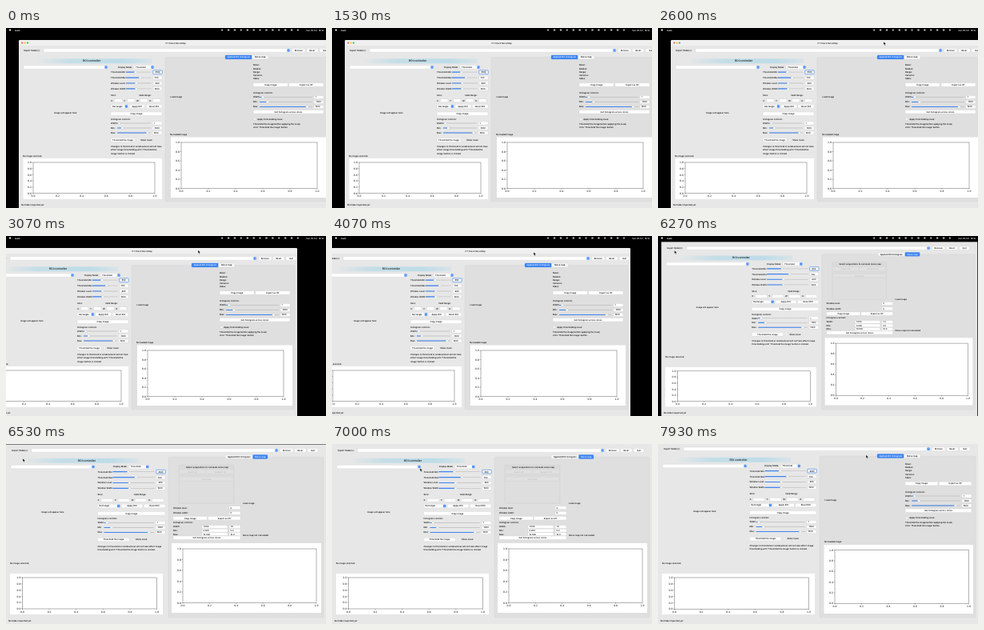
An HTML page that plays this animation: 400 by 225 pixels, repeating every 8000 ms.

```html
<!DOCTYPE html>
<html lang="en">
<head>
<meta charset="utf-8">
<title>Histogram tool</title>
<style>
html, body { margin: 0; width: 100%; height: 100%; overflow: hidden; background: #000; }
svg { display: block; width: 400px; height: 225px; fill: #050505; font: 500 2.65px Inter, "Open Sans", sans-serif; }
text { text-rendering: geometricPrecision; white-space: pre; }
.tick { font: 3.1px "DejaVu Sans", sans-serif; }
</style>
</head>
<body>
<svg id="stage" viewBox="0 0 400 225"></svg>
<script>
const NS = 'http://www.w3.org/2000/svg';
const LOOP = 8000;
const BLUE = '#3d84f2', BG = '#e7e7e7', PANE = '#dfdfdf';
const stage = document.getElementById('stage');

function el(parent, tag, attrs = {}) {
  const node = document.createElementNS(NS, tag);
  for (const k in attrs) node.setAttribute(k, attrs[k]);
  return parent.appendChild(node);
}
const group = parent => el(parent, 'g');
const box = (g, l, t, r, b, fill, extra) =>
  el(g, 'rect', { x: l, y: t, width: r - l, height: b - t, fill, ...extra });
const dot = (g, cx, cy, r, fill) => el(g, 'circle', { cx, cy, r, fill });
function label(g, x, y, str, extra) {
  el(g, 'text', { x, y: y + 0.95, ...extra }).textContent = str;
}
const centred = (g, x, y, str, extra) => label(g, x, y, str, { 'text-anchor': 'middle', ...extra });

function button(g, l, r, y, str, off) {
  box(g, l, y - 2.2, r, y + 2.2, off ? '#e1e1e1' : '#fff', { rx: 1, stroke: off ? '#d6d6d6' : '#c9c9c9', 'stroke-width': 0.3 });
  centred(g, (l + r) / 2, y, str, off && { fill: '#bdbdbd' });
}
function field(g, l, r, y, str = '') {
  box(g, l, y - 2, r, y + 2, '#fff', { stroke: '#c4c4c4', 'stroke-width': 0.3 });
  label(g, l + 1.5, y, str);
}
function combo(g, l, r, y, str = '') {
  box(g, l, y - 2.2, r, y + 2.2, '#fff', { rx: 1, stroke: '#c4c4c4', 'stroke-width': 0.3 });
  box(g, r - 3.6, y - 1.8, r - 0.4, y + 1.8, BLUE, { rx: 0.8 });
  el(g, 'path', { d: `M${r - 2.8} ${y - .4}l.8 -.8l.8 .8M${r - 2.8} ${y + .4}l.8 .8l.8 -.8`, stroke: '#fff', 'stroke-width': 0.35, fill: 'none' });
  label(g, l + 2, y, str);
}
function slider(g, l, r, y, v) {
  const k = l + (r - l) * v;
  box(g, l, y - 0.4, r, y + 0.4, '#c6c6c6', { rx: 0.4 });
  box(g, l, y - 0.6, k, y + 0.6, BLUE, { rx: 0.5 });
  el(g, 'circle', { cx: k, cy: y, r: 1.5, fill: '#fff', stroke: '#b5b5b5', 'stroke-width': 0.3 });
}
function check(g, x, y, str) {
  box(g, x - 1.2, y - 1.2, x + 1.2, y + 1.2, '#fff', { rx: 0.5, stroke: '#bbb', 'stroke-width': 0.3 });
  label(g, x + 3.2, y, str);
}
function lines(g, x, y, list, step = 4.2) {
  list.forEach((s, i) => label(g, x, y + i * step, s));
}
function chart(g, [l, t, r, b], [pl, pt, pr, pb]) {
  box(g, pl, pt, pr, pb, '#fff');
  box(g, l, t, r, b, '#fff', { stroke: '#222', 'stroke-width': 0.35 });
  for (let i = 0; i <= 5; i++) {
    const x = l + (r - l) * i / 5, y = b - (b - t) * i / 5, s = (i / 5).toFixed(1);
    el(g, 'path', { d: `M${x} ${b}v1.2M${l} ${y}h-1.2`, stroke: '#222', 'stroke-width': 0.35 });
    el(g, 'text', { class: 'tick', x, y: b + 4.5, 'text-anchor': 'middle' }).textContent = s;
    el(g, 'text', { class: 'tick', x: l - 2, y: y + 1.1, 'text-anchor': 'end' }).textContent = s;
  }
}

function toolbar(g, x, y) {
  label(g, x + 6, y, 'Import folder(s):');
  combo(g, x + 31, x + 339, y);
  button(g, x + 341.5, x + 358, y, 'Remove');
  button(g, x + 359.5, x + 374, y, 'Reset');
  button(g, x + 376, x + 389, y, 'Quit');
}

function histogram(g, l, r, y, vals) {
  label(g, l, y, 'Histogram controls:');
  ['Width:', 'Min:', 'Max:'].forEach((s, i) => {
    const ry = y + 5 + i * 6;
    label(g, l, ry, s);
    slider(g, l + 8, r - 14, ry, [.06, .15, .9][i]);
    field(g, r - 12, r, ry, vals[i]);
  });
}

function leftPane(g, p) {
  const { x, cx, cr, dy } = p, mid = (cx + cr) / 2;
  const Y = y => y + dy;
  box(g, x + 22, Y(38.3), x + 166, Y(44.3), 'url(#band)');
  centred(g, (x + cr) / 2 + 1.5, Y(41.3), 'ROI controller', { style: 'font-size:3.4px' });
  combo(g, x + 6, x + 111, Y(49));
  label(g, mid - 23, Y(49), 'Display Mode:');
  combo(g, mid - 3, mid + 22, Y(49), 'Threshold');
  [['Threshold Min', .37, '-950'], ['Threshold Max', .55, '700'],
   ['Window Level', .4, '-600'], ['Window Width', .4, '1500']].forEach(([s, v, n], i) => {
    const y = Y(55.2 + i * 6.9);
    label(g, cx, y, s + ':');
    slider(g, cx + 19, cr - 13, y, v);
    field(g, cr - 11, cr, y, n);
  });
  box(g, cr - 11.3, Y(52.8), cr + .3, Y(57.6), 'none', { rx: .6, stroke: '#6aa5f5', 'stroke-width': .8 });
  box(g, cr - 3.2, Y(53.8), cr - 2.8, Y(56.7), '#222', { class: 'caret' });
  label(g, cx, Y(84), 'Slice:');
  label(g, mid + 3, Y(84), 'Valid Range:');
  ['X:', 'Y:', 'W:', 'H:'].forEach((s, i) => {
    const w = (cr - cx) / 4, fx = cx + i * w;
    label(g, fx, Y(90.8), s);
    field(g, fx + 4.5, fx + w - 2, Y(90.8));
  });
  const w = (cr - cx) / 3;
  combo(g, cx, cx + w, Y(98), 'Rectangle');
  button(g, cx + w + 1.5, cx + 2 * w, Y(98), 'Apply ROI');
  button(g, cx + 2 * w + 1.5, cr, Y(98), 'Reset ROI');
  button(g, cx, cr, Y(107.3), 'Copy Image');
  histogram(g, cx, cr, Y(114), ['1', '-1000', '1500']);
  button(g, cx, cx + (cr - cx) * .47, Y(140), 'Threshold the image');
  check(g, mid + 2, Y(140), 'Show mask');
  lines(g, cx, Y(148.2), p.note);
  label(g, x + 44, p.imgY, 'Image will appear here');
  label(g, x + 5, p.selY, 'No image selected');
  chart(g, p.axes, p.fig);
  label(g, x + 3, 221, 'No folder imported yet');
}

function tabs(g, l, m, r, y, active) {
  [[l, m, 'Applied ROI Histogram'], [m, r, 'Noise map']].forEach(([a, b, s], i) => {
    const on = i === active;
    box(g, a, y - 2.4, b, y + 2.4, on ? BLUE : '#f7f7f7', { rx: 1, stroke: on ? BLUE : '#c4c4c4', 'stroke-width': .3 });
    centred(g, (a + b) / 2, y, s, on && { fill: '#fff' });
  });
}

function roiPane(g, p) {
  const { rr, dy } = p, l = 309, Y = y => y + dy;
  box(g, p.pane[0], Y(36.5), p.pane[1], 217, PANE, { rx: 1.5, stroke: '#d0d0d0', 'stroke-width': .3 });
  tabs(g, 274, 307.5, 328, Y(36.5), 0);
  lines(g, l, Y(46.5), ['Mean:', 'Median:', 'Range:', 'Variance:', 'Stdev:']);
  const mid = (l + rr) / 2;
  button(g, l, mid - .7, Y(71), 'Copy Image');
  button(g, mid + .7, rr, Y(71), 'Export as tiff');
  label(g, p.pane[0] + 6.5, p.loadY, 'Load image');
  histogram(g, l, rr, Y(81.5), ['1', '-1000', '1500']);
  button(g, l, rr, Y(104.7), 'Get histogram across slices');
  check(g, l + 2, Y(114), 'Apply thresholding mask');
  lines(g, l, Y(119.6), ['Threshold the image before applying the mask;', "click 'Threshold the image' button"]);
  label(g, p.pane[0] + 6, p.noneY, 'No loaded image');
  chart(g, p.rAxes, p.rFig);
}

function noisePane(g, p) {
  const { dy, rl } = p, rr = 293, Y = y => y + dy;
  box(g, p.pane[0], Y(36.5), p.pane[1], 217, PANE, { rx: 1.5, stroke: '#d0d0d0', 'stroke-width': .3 });
  tabs(g, 274, 308.5, 327, Y(36.5), 1);
  box(g, 216, Y(46.5), 285, Y(95), '#dadada', { rx: 1, stroke: '#cfcfcf', 'stroke-width': .3 });
  centred(g, 251.5, Y(49.3), 'Select acquisitions to calculate noise map');
  button(g, 217, 249.5, Y(55.3), 'Select all', true);
  button(g, 251, 284, Y(55.3), 'Deselect all', true);
  button(g, 217, 284, Y(64.3), 'Calculate', true);
  box(g, 217, Y(67.5), 284, Y(94), '#dedede');
  label(g, p.sideX, p.loadY, 'Load image');
  ['Window level:', 'Window width:'].forEach((s, i) => {
    label(g, rl, Y(100.2 + i * 6.6), s);
    field(g, 279, rr, Y(100.2 + i * 6.6), '0');
  });
  button(g, rl, 251.5, Y(113.2), 'Copy Image');
  button(g, 252.5, rr, Y(113.2), 'Export as tiff');
  label(g, rl, Y(118.8), 'Histogram controls:');
  [['Width:', '1.000', '1.0'], ['Min:', '0.000', '0.0'], ['Max:', '10.000', '10.0']].forEach(([s, a, b], i) => {
    const y = Y(124 + i * 4.6);
    label(g, rl, y, s);
    field(g, 245, 277, y, a);
    field(g, 279, rr, y, b);
  });
  button(g, rl, rr, Y(137.8), 'Get histogram across slices');
  label(g, p.sideX, Y(135), 'Noise map not calculated');
  chart(g, p.rAxes, p.rFig);
}

function titleBar(g, x, y) {
  box(g, x, y, x + 390, y + 7, '#efefef', { rx: 1.5 });
  ['#fb5f57', '#fcbc2f', '#2ac840'].forEach((c, i) => dot(g, x + 4.2 + i * 3.4, y + 3.6, 1.15, c));
  centred(g, x + 196, y + 3.8, 'CT-Stack NoiseMap', { fill: '#333', 'font-weight': 600 });
}

const defs = el(stage, 'defs');
const band = el(defs, 'linearGradient', { id: 'band' });
[[0, 0], [.3, .75], [.75, .9], [1, .3]].forEach(([offset, a]) =>
  el(band, 'stop', { offset, 'stop-color': '#b9dbe8', 'stop-opacity': a }));

const NOTE3 = ['Changes to threshold or window/level will not take', "effect image thresholding until 'Threshold the", "image' button is clicked"];
const NOTE_MID = ['Changes to threshold or window/level will not take effect', "image thresholding until 'Threshold the image' button is", 'clicked'];
const NOTE2 = ['Changes to threshold or window/level will not take effect image', "thresholding until 'Threshold the image' button is clicked"];

function scene(p) {
  const g = group(stage);
  box(g, p.x, p.top, p.x + p.w, 226, BG, { rx: p.titled ? 1.5 : 0 });
  if (p.titled) titleBar(g, p.x, p.top);
  toolbar(g, p.x + (p.titled ? 0 : 1), p.barY);
  leftPane(g, p);
  p.right(g, p);
  return g;
}

const winRoi = scene({
  x: 16, w: 390, top: 15, titled: true, barY: 28, cx: 131, cr: 195, dy: 0, note: NOTE3, imgY: 106, selY: 160.5,
  axes: [34, 168, 186, 206.5], fig: [21.5, 163, 195, 214],
  right: roiPane, rr: 397, pane: [199, 403], loadY: 86.3, noneY: 133.3,
  rAxes: [219, 143, 389, 200.5], rFig: [206, 136.5, 400, 212]
});
const winNoise = scene({
  x: 8.5, w: 390, top: 15, titled: true, barY: 28, cx: 122, cr: 201, dy: 0, note: NOTE_MID, imgY: 106, selY: 160.5,
  axes: [24, 168, 192, 206.7], fig: [13, 163, 198, 214],
  right: noisePane, rl: 211, pane: [207, 396], sideX: 288, loadY: 89,
  rAxes: [225, 150.3, 392, 202], rFig: [211, 145, 395, 212]
});
const fullNoise = scene({
  x: 0, w: 400, top: 0, barY: 8, cx: 114.5, cr: 199, dy: -20.5, note: NOTE2, imgY: 85, selY: 148.7,
  axes: [20.5, 167, 188.5, 206], fig: [5, 162, 196, 213],
  right: noisePane, rl: 209, pane: [203, 397], sideX: 296, loadY: 74,
  rAxes: [221, 131, 388, 198.5], rFig: [207, 124, 394, 211]
});
const fullRoi = scene({
  x: 0, w: 400, top: 0, barY: 6.3, cx: 114.5, cr: 198, dy: -21.5, note: NOTE2, imgY: 84, selY: 149,
  axes: [20.5, 167, 188.5, 206.3], fig: [5, 162, 196, 213],
  right: roiPane, rr: 392, pane: [202, 397], loadY: 70.3, noneY: 122.5,
  rAxes: [221, 132.5, 388.5, 199.3], rFig: [207.5, 126, 394, 212]
});
const scenes = [winRoi, winNoise, fullNoise, fullRoi];

const menu = group(stage);
box(menu, 0, 0, 400, 5.5, '#000');
dot(menu, 5, 2.6, 1.1, '#fff');
label(menu, 11, 2.6, 'main', { fill: '#fff', 'font-weight': 700 });
for (let i = 0; i < 13; i++) {
  const x = 269 + i * 7.9;
  if (i % 3) box(menu, x, 1.6, x + 2.4, 3.6, '#bbb', { rx: .6 });
  else dot(menu, x + 1.1, 2.6, 1.1, '#bbb');
}
label(menu, 397, 2.6, 'Sun 29 Oct  18:16', { fill: '#fff', 'text-anchor': 'end' });

const cursor = el(stage, 'path', { d: 'M0 0v4.2l1 -.9l.7 1.6l.8 -.35l-.7 -1.5h1.3z', fill: '#000', stroke: '#fff', 'stroke-width': .4 });
const carets = stage.querySelectorAll('.caret');

// Rows: time, x, y
const drag = [[2670, 0, 0], [3070, -42, 0], [3500, -47, 0], [4070, -33, 0], [4400, -7.5, 0]];
const mouse = [[1870, 402, 70], [2250, 310, 30], [2600, 282, 17], [2670, 282, 17], [3070, 240, 17.5],
  [3500, 236, 20], [4070, 252, 20], [4400, 277, 21], [4700, 319, 36], [5330, 319, 36], [6000, 20, 18],
  [6530, 21, 18], [7000, 110, 30], [7560, 290, 14.5], [7720, 290, 14.5], [7930, 260, 13.5]];

function at(rows, t) {
  const i = rows.findIndex(r => r[0] > t);
  if (i === 0) return rows[0].slice(1);
  if (i < 0) return rows[rows.length - 1].slice(1);
  const a = rows[i - 1], b = rows[i];
  const u = (t - a[0]) / (b[0] - a[0]), e = u * u * (3 - 2 * u);
  return [a[1] + (b[1] - a[1]) * e, a[2] + (b[2] - a[2]) * e];
}
const ramp = (t, a, b) => Math.min(1, Math.max(0, (t - a) / (b - a)));

function draw(t) {
  const active = t < 4720 ? 0 : t < 6210 ? 1 : t < 7670 ? 2 : 3;
  scenes.forEach((s, i) => s.setAttribute('visibility', i === active ? 'visible' : 'hidden'));
  winRoi.setAttribute('transform', `translate(${at(drag, t)})`);

  const grow = 1 - Math.pow(1 - ramp(t, 6210, 6500), 3), rest = 1 - grow;
  fullNoise.setAttribute('transform',
    `translate(${8.5 * rest} ${15 * rest}) scale(${1 - .025 * rest} ${1 - .067 * rest})`);
  menu.setAttribute('transform', `translate(0 ${-6 * ramp(t, 6380, 6560)})`);

  const phase = t % 1070;
  const blink = phase < 535 ? 1 - ramp(phase, 490, 535) : ramp(phase, 1025, 1070);
  carets.forEach(c => c.setAttribute('opacity', blink));

  cursor.setAttribute('visibility', t < 1870 ? 'hidden' : 'visible');
  cursor.setAttribute('transform', `translate(${at(mouse, t)})`);
}

function tick() {
  draw(performance.now() % LOOP);
  requestAnimationFrame(tick);
}
tick();
</script>
</body>
</html>
```
